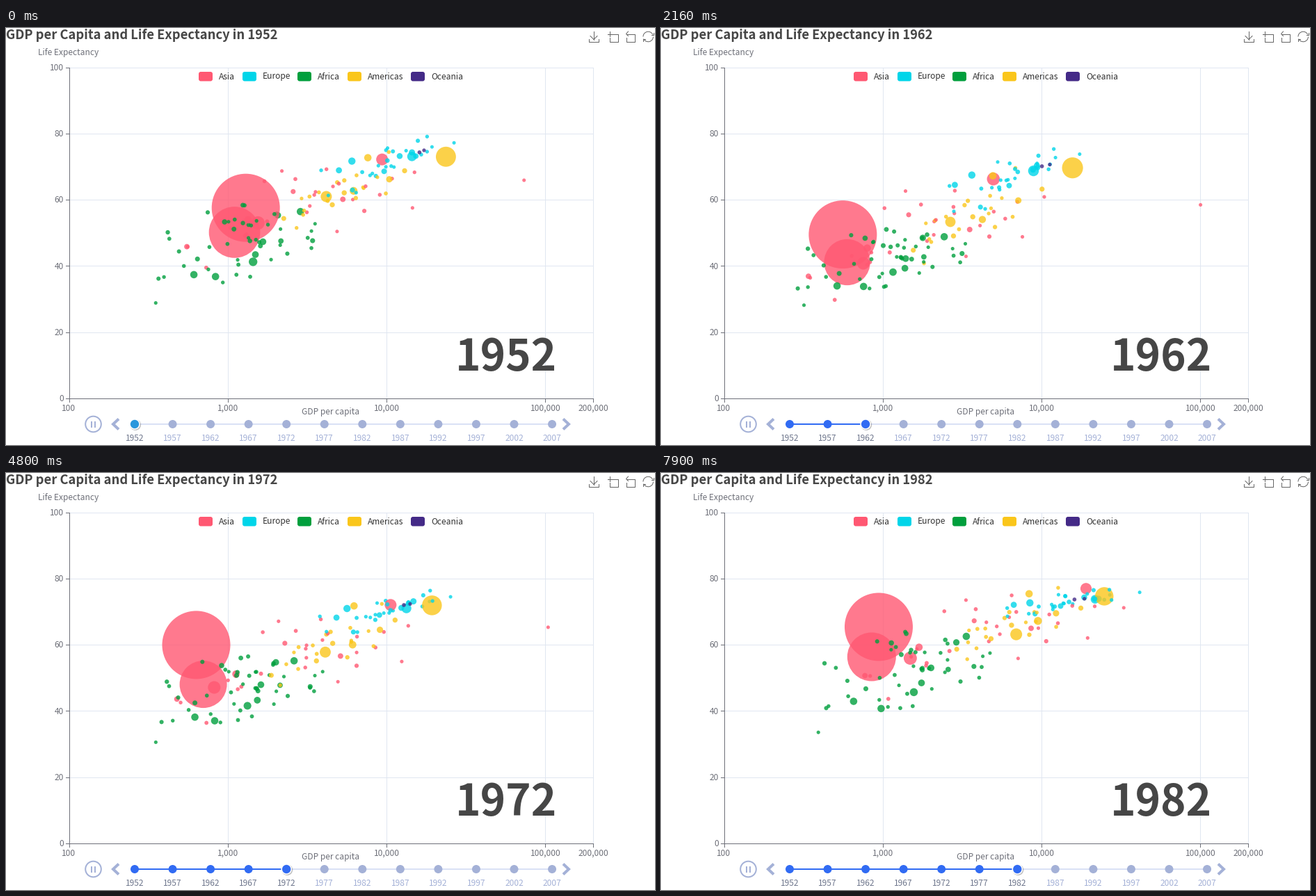
A matplotlib script for the animation above (8 s loop, 933 by 600 pixels).

```python
import numpy as np
import matplotlib.pyplot as plt
from matplotlib.animation import FuncAnimation
from matplotlib.patches import Arc, Circle, FancyBboxPatch

W, H, DPI = 933, 600, 100
PX = 72 / DPI
INTERVAL, FRAMES = 80, 100
STEP_MS, PHASE_MS = 1247, 622      # time per year step, time already spent in the first
DELAY_MS, MOVE_MS, SLIDE_MS = 135, 915, 300
YEARS = np.append(np.arange(1952, 1983, 5), 2007)   # 2007 precedes the first step

plt.rcParams["font.family"] = ["Noto Sans CJK JP", "DejaVu Sans"]

AS, EU, AF, AM, OC = "Asia", "Europe", "Africa", "Americas", "Oceania"
COLORS = {AS: "#ff5872", EU: "#00d5e9", AF: "#009f3d", AM: "#fac61b", OC: "#442a87"}

# Small bubbles form one random cloud per continent: count, income spread,
# income-life correlation, then (log10 income, life, life spread) keys.
CLOUDS = {
    AF: (51, .31, .45, (2.99, 39.1, 5), (3.16, 51.6, 7), (3.2, 54.8, 9)),
    AS: (29, .38, .55, (3.18, 46.3, 9), (3.63, 62.6, 8), (3.8, 70.7, 7)),
    EU: (29, .22, .8, (3.7, 64.4, 6), (3.98, 69.7, 3.5), (4.16, 72.8, 2.2), (4.36, 77.6, 3)),
    AM: (22, .22, .65, (3.5, 53.3, 9), (3.8, 66.2, 6.5), (3.97, 73.6, 4.4)),
    OC: (2, .03, .5, (4.01, 69.3, .3), (4.27, 74.3, .5), (4.47, 80.7, .5)),
}

# Leading bubbles: (income, life, population as % of the largest) keys.
LEADERS = [
    (AS, (400, 44, 100), (576, 50.5, 100), (488, 44.5, 100), (613, 58.4, 100),
     (677, 63.1, 100), (741, 64, 100), (962, 65.5, 100), (4959, 73, 100)),
    (AS, (547, 37.4, 65), (856, 56.6, 70), (2452, 64.7, 84)),
    (AS, (750, 37.5, 14), (762, 46, 14), (1517, 56.2, 15), (3541, 70.6, 17)),
    (AS, (3217, 63, 15.5), (9848, 71.4, 13), (19384, 77.1, 12), (31656, 82.6, 10)),
    (AS, (108000, 55.6, .1), (95000, 60.5, .1), (109000, 67.7, .1), (31400, 71.3, .1),
     (47300, 77.6, .1)),
    (EU, (7144, 67.5, 12), (22032, 73.8, 8), (32170, 79.4, 6)),
    (AF, (1077, 36.3, 6), (1577, 45.8, 7), (2014, 46.9, 10)),
    (AM, (2109, 50.9, 10), (7031, 63.3, 13), (9066, 72.4, 14)),
    (AM, (3478, 50.8, 5.4), (9611, 67.4, 7), (11978, 76.2, 8)),
    (AM, (13990, 68.4, 28), (25010, 74.7, 23), (42952, 78.2, 23)),
]


def x_of(log_income):
    return 90.5 + 228.3 * (log_income - 2)


def y_of(life):
    return 533 - 4.765 * life


def track(log_income, life, share):
    """Pixel x, y and radius at each of the YEARS."""
    return x_of(log_income), y_of(life), 2.5 + .465 * np.broadcast_to(share, len(YEARS))


def keyed(keys):
    """Key columns at each of the YEARS; keys divide 1952..1982, the last is 2007."""
    at = np.append(np.linspace(1952, 1982, len(keys) - 1), 2007)
    return [np.interp(YEARS, at, column) for column in np.transpose(keys)]


def leader(continent, *keys):
    income, life, share = keyed([(np.log10(i), l, s) for i, l, s in keys])
    return continent, track(income, life, share)


def cloud(rng, continent, count, spread, corr, *keys):
    income, life, life_spread = keyed(keys)
    for _ in range(count):
        rich, fit = np.clip(rng.normal(size=2), -1.9, 1.9)
        health = corr * rich + np.sqrt(1 - corr ** 2) * fit
        share = min(rng.lognormal(-.3, 1), 6)
        wobble = rng.normal(size=(2, len(YEARS)))
        yield continent, track(income + spread * rich + .025 * wobble[0],
                               life + life_spread * health + .5 * wobble[1], share)


rng = np.random.default_rng(12)
dots = [dot for name, shape in CLOUDS.items() for dot in cloud(rng, name, *shape)]
dots = [dots[i] for i in rng.permutation(len(dots))]
behind = len(dots) // 4
dots[behind:behind] = [leader(*row) for row in LEADERS]
TRACKS = np.array([path for _, path in dots])

fig = plt.figure(figsize=(W / DPI, H / DPI), dpi=DPI, facecolor="white")
ax = fig.add_axes([0, 0, 1, 1])
ax.set(xlim=(0, W), ylim=(H, 0))
ax.axis("off")

AXIS, GRID, ICON = "#6e7079", "#e0e6f1", "#666666"
SOFT, RAIL, BLUE, DARK = "#a4b1d7", "#dae1f5", "#316bf3", "#464646"


def line(xs, ys, color, width=1, z=1, **kw):
    return ax.plot(xs, ys, color=color, lw=width * PX, zorder=z, **kw)[0]


def label(x, y, s, size=12, color=AXIS, ha="center", **kw):
    return ax.text(x, y, s, fontsize=size * PX, color=color, ha=ha, va="baseline", **kw)


def marker_area(radius):
    return (2 * radius * PX) ** 2


# Grid and axes
for value in range(0, 101, 20):
    y = y_of(value)
    line([91, 844], [y, y], GRID)
    line([86, 91], [y, y], AXIS, z=2)
    label(83, y + 4.3, str(value), ha="right")
for value in (100, 1000, 10000, 100000, 200000):
    x = x_of(np.log10(value))
    line([x, x], [56.5, 533], GRID)
    line([x, x], [533, 538], AXIS, z=2)
    label(x, 551, f"{value:,}")
line([90.5, 90.5], [56.5, 533], AXIS, z=2)
line([90.5, 844], [533, 533], AXIS, z=2)
label(90, 39.5, "Life Expectancy")
label(467, 556, "GDP per capita")

# Legend
for x, (name, color) in zip((277, 340, 419, 491, 582), COLORS.items()):
    pass
LEGEND = zip((AS, EU, AF, AM, OC), (277, 340, 419, 491, 582))
for name, x in LEGEND:
    ax.add_patch(FancyBboxPatch((x + 3, 66), 14, 7.5, boxstyle="round,pad=3",
                                fc=COLORS[name], ec="none", zorder=6))
    label(x + 29, 73.5, name, color="#333333", ha="left", zorder=6)

# Toolbox
ICON_PATHS = [
    [(845, 5), (845, 16.5)], [(840, 11.5), (845, 16.5), (850, 11.5)],
    [(838, 16), (838, 20), (852, 20), (852, 16)],
    [(864.5, 8.5), (871.5, 8.5)], [(868, 5), (868, 12)],
    [(873, 8.5), (879.5, 8.5), (879.5, 20), (868, 20), (868, 13.5)],
    [(894.5, 5), (891.5, 8.5), (894.5, 11.5)],
    [(891.5, 8.5), (903.5, 8.5), (903.5, 20), (891.5, 20), (891.5, 13.5)],
    [(928, 9.5), (930.5, 9.5), (930.5, 6.5)], [(918.5, 15.5), (916, 15.5), (916, 18.5)],
]
for path in ICON_PATHS:
    line(*zip(*path), ICON)
for start in (0, 180):
    ax.add_patch(Arc((923.2, 12.5), 14.5, 14.5, theta1=start, theta2=start + 155,
                     ec=ICON, lw=PX))

# Player
STOPS = 185 + 54.55 * np.arange(12)
RAIL_Y = 570
ax.add_patch(Circle((125.5, RAIL_Y), 11.3, fc="none", ec=SOFT, lw=2 * PX))
for x in (123, 128):
    line([x, x], [565.5, 574.5], SOFT, 2, solid_capstyle="butt")
for tip, back in ((154, 162), (809, 801)):
    line([back, tip, back], [562.5, RAIL_Y, 577.5], SOFT, 4,
         solid_capstyle="butt", solid_joinstyle="miter")
line(STOPS[[0, -1]], [RAIL_Y] * 2, RAIL, 2)
progress = line([], [], BLUE, 2, z=2)
stops = ax.scatter(STOPS, [RAIL_Y] * 12, s=marker_area(6), c=SOFT, lw=0, zorder=3)
pointer = ax.scatter([0] * 3, [0] * 3, s=marker_area(np.array([8, 7.8, 6.2])),
                     lw=0, zorder=4)
year_labels = [label(x, 594.5, str(1952 + 5 * i)) for i, x in enumerate(STOPS)]

# Changing parts
title = label(0, 16, "", 18.4, DARK, "left", weight="bold")
big_year = label(792, 492.5, "", 62, DARK, "right", weight="bold", zorder=3)
bubbles = ax.scatter(TRACKS[:, 0, 0], TRACKS[:, 1, 0], c=[COLORS[name] for name, _ in dots],
                     alpha=.8, lw=0, zorder=5)


def quintic_in_out(k):
    return 16 * k ** 5 if k < .5 else 1 - 16 * (1 - k) ** 5


def update(frame):
    step, elapsed = divmod(frame * INTERVAL + PHASE_MS, STEP_MS)

    k = np.clip((elapsed - DELAY_MS) / MOVE_MS, 0, 1)
    x, y, radius = ((1 - k) * TRACKS[:, :, step - 1] + k * TRACKS[:, :, step]).T
    bubbles.set_offsets(np.column_stack([x, y]))
    bubbles.set_sizes(marker_area(radius))

    year = str(YEARS[step])
    title.set_text(f"GDP per Capita and Life Expectancy in {year}")
    big_year.set_text(year)

    slide = quintic_in_out(min(elapsed / SLIDE_MS, 1))
    at = STOPS[0] + 54.55 * max(step - 1 + slide, 0)
    progress.set_data([STOPS[0], at], [RAIL_Y] * 2)
    stops.set_facecolors([BLUE if s <= at + .5 else SOFT for s in STOPS])
    pointer.set_offsets([(at + 1, RAIL_Y + 1), (at, RAIL_Y), (at, RAIL_Y)])
    pointer.set_facecolors([(0, 0, 0, .25), "white", BLUE if step else "#2a97dc"])
    for i, text in enumerate(year_labels):
        text.set_color("#6f778d" if i <= step else SOFT)
    return bubbles, title, big_year, progress, stops, pointer, *year_labels


anim = FuncAnimation(fig, update, frames=FRAMES, interval=INTERVAL,
                     repeat=True, repeat_delay=0, blit=False)
plt.show()
```
